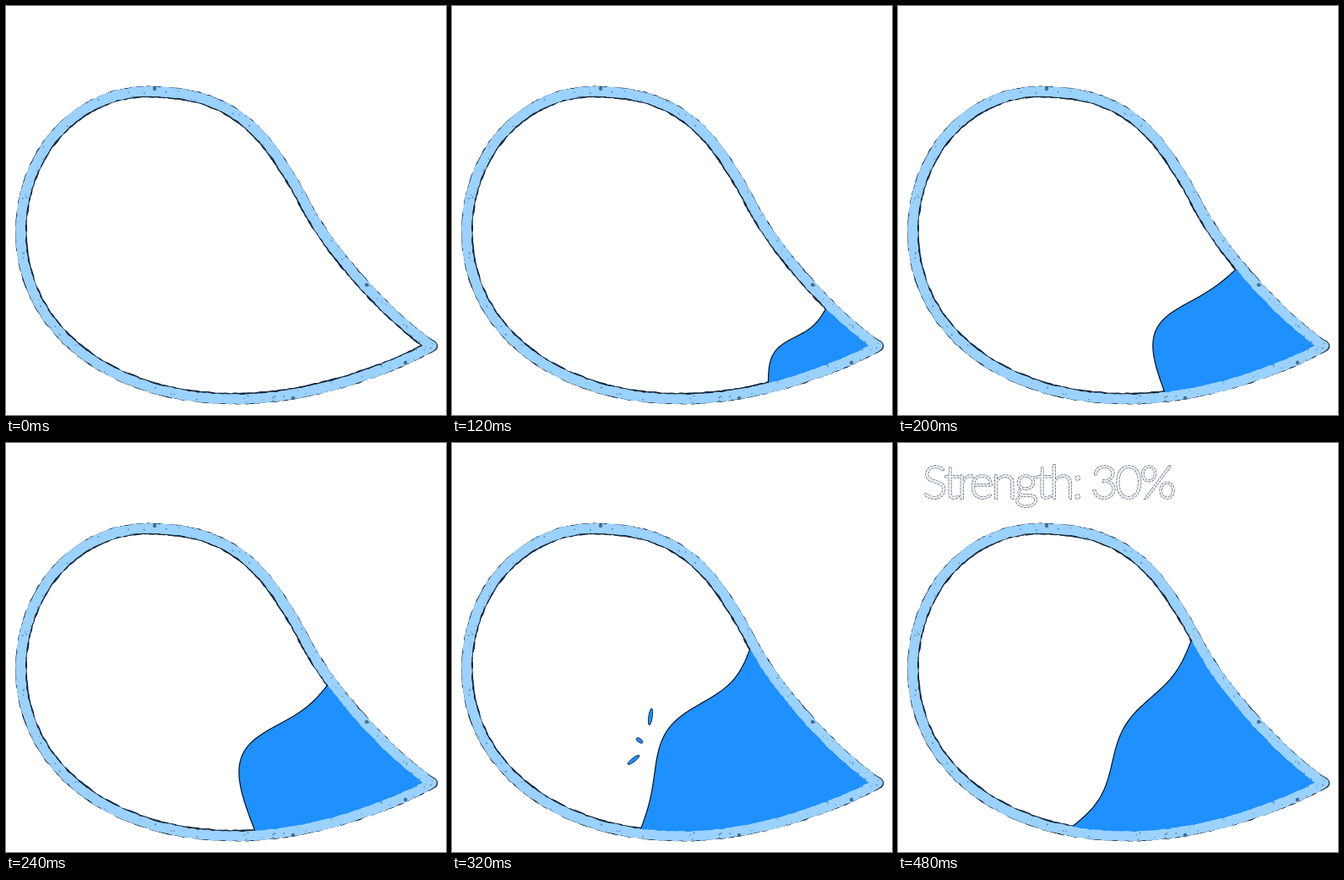
Write an HTML page with a canvas that moves like this. It is 521 px wide and 484 px high and loops after 0.52 s.

```html
<!DOCTYPE html>
<html lang="en">
<head>
<meta charset="utf-8">
<title>Strength meter</title>
<style>
  html, body { margin: 0; width: 100%; height: 100%; overflow: hidden; background: #fff; }
  canvas, svg { position: absolute; left: 0; top: 0; width: 521px; height: 484px; }
  text {
    font: 300 56px Lato, "Open Sans", sans-serif;
    letter-spacing: -3.4px;
    text-anchor: middle;
    fill: #edf1f6;
    stroke: #56606c;
    stroke-dasharray: 3 1;
    paint-order: stroke;
  }
</style>
</head>
<body>
<canvas id="stage" width="521" height="484"></canvas>
<svg viewBox="0 0 521 484"><text id="label">Strength: 30%</text></svg>
<script>
const W = 521, H = 484, STEP = 40, LOOP = 520;
const WATER = '#1e90ff';
const ctx = document.getElementById('stage').getContext('2d');
const label = document.getElementById('label');

let seed = 7;
const rand = () => (seed = (seed * 16807) % 2147483647) / 2147483647;
const jitter = size => (rand() - 0.5) * size;
const mix = (a, b, t) => a + (b - a) * t;
const clamp = t => Math.max(0, Math.min(1, t));

// Centre line of the rim, anticlockwise from the tip: two handles and an end per curve
const TIP = [504.5, 402.5];
const curves = [
  [[452, 366], [383, 292], [350, 226]],
  [[304, 141], [264, 103], [172, 101]],
  [[88, 99], [17.5, 170], [17.5, 268]],
  [[17.5, 380], [120, 465], [270, 465]],
  [[352, 466], [448, 434], TIP]
];

function sampleRim(n) {
  const pts = [TIP];
  let a = TIP;
  for (const [b, c, d] of curves) {
    for (let k = 1; k <= n; k++) {
      const t = k / n, s = 1 - t;
      pts.push([0, 1].map(j =>
        s * s * s * a[j] + 3 * s * s * t * b[j] + 3 * s * t * t * c[j] + t * t * t * d[j]));
    }
    a = d;
  }
  return pts;
}

const rim = sampleRim(120);

// Rim point i moved inwards by dist
function inset(i, dist) {
  const [x, y] = rim[i], [u, v] = rim[i + 1];
  const len = Math.hypot(u - x, v - y);
  return [x + (v - y) / len * dist, y - (u - x) / len * dist];
}

const inner = rim.slice(0, -1).map((p, i) => inset(i, 6));
const upperWall = inner.slice(0, 200), lowerWall = inner.slice(380);
const wallAt = (wall, x) =>
  wall.reduce((best, p) => Math.abs(p[0] - x) < Math.abs(best[0] - x) ? p : best);

function trace(c, pts) {
  pts.forEach(([x, y], i) => i ? c.lineTo(x, y) : c.moveTo(x, y));
}

function layer(draw) {
  const cv = document.createElement('canvas');
  cv.width = W;
  cv.height = H;
  draw(cv.getContext('2d'));
  return cv;
}

// Rough line: every short piece gets its own width and sideways shift
function roughLine(c, color, width, shift) {
  c.strokeStyle = color;
  c.lineCap = 'round';
  for (let i = 0; i < rim.length - 2; i++) {
    const side = shift + jitter(1.2);
    c.lineWidth = width + jitter(1.4);
    c.beginPath();
    trace(c, [inset(i, side), inset(i + 1, side)]);
    c.stroke();
  }
}

const edge = layer(c => roughLine(c, '#17293b', 12.9, 0.5));

const band = layer(c => {
  roughLine(c, '#9bd2ff', 10.9, -0.1);
  const speck = (x, y, r, color) => {
    c.fillStyle = color;
    c.beginPath();
    c.arc(x, y, r, 0, 7);
    c.fill();
  };
  for (let i = 0; i < 110; i++) {
    const [x, y] = inset(Math.floor(rand() * 600), jitter(12));
    speck(x, y, 0.4 + rand() * 0.8, '#6392b8');
  }
  for (const [x, y] of [[176, 98], [340, 464], [473, 422], [427, 330]]) {
    speck(x, y, 2.2, '#456f94');
  }
});

// Where the water front meets the walls, every second step
const upperX = [499, 466, 419, 381, 353, 347];
const lowerX = [499, 408, 339, 294, 223, 207];

function keyed(keys, step) {
  const k = Math.min(step / 2, keys.length - 1), i = Math.floor(k);
  return mix(keys[i], keys[Math.min(i + 1, keys.length - 1)], k - i);
}

// The front is a chord between the walls, bent by three sine waves
function waterFront(step) {
  const [x, y] = wallAt(upperWall, keyed(upperX, step));
  const [u, v] = wallAt(lowerWall, keyed(lowerX, step));
  const dx = u - x, dy = v - y;
  const swell = 0.25 * Math.exp(-(((Math.min(step, 10) - 5.5) / 2.6) ** 2));
  const lean = mix(-0.07, 0.01, clamp((step - 6) / 4));
  const ripple = -0.032 * clamp((step - 5) / 3);
  const pts = [];
  for (let s = -0.04; s <= 1.045; s += 0.02) {
    const a = Math.PI * s;
    const h = swell * Math.sin(a) + lean * Math.sin(2 * a) + ripple * Math.sin(3 * a);
    pts.push([x + dx * s - dy * h, y + dy * s + dx * h]);
  }
  return pts;
}

function drawWater(step) {
  const front = waterFront(step);
  const first = front[0], last = front[front.length - 1];
  ctx.save();
  ctx.beginPath();
  trace(ctx, rim);
  ctx.clip();
  ctx.beginPath();
  trace(ctx, [...front, [last[0], H], [W, H], [W, first[1]]]);
  ctx.fillStyle = WATER;
  ctx.fill();
  ctx.beginPath();
  trace(ctx, front);
  ctx.strokeStyle = '#07111c';
  ctx.lineWidth = 1.2;
  ctx.stroke();
  ctx.restore();
}

const drops = [
  { x: 235, y: 324, vx: 2, vy: -14, len: 20 },
  { x: 222, y: 352, vx: -15, vy: -10, len: 9 },
  { x: 215, y: 375, vx: -13, vy: 10, len: 17 }
];

// Drops fly along their own axis and shrink
function drawDrops(step) {
  const t = (step - 8) / 2;
  ctx.fillStyle = WATER;
  ctx.strokeStyle = '#0d2a45';
  ctx.lineWidth = 1;
  for (const { x, y, vx, vy, len } of drops) {
    ctx.beginPath();
    ctx.ellipse(x + vx * t, y + vy * t, len / 2 * (1 - 0.4 * t), 2.2, Math.atan2(vy, vx), 0, 7);
    ctx.fill();
    ctx.stroke();
  }
}

function drawLabel(step) {
  label.style.display = step >= 9 ? '' : 'none';
  if (step < 9) return;
  const t = (step - 10) / 2, s = mix(0.646, 1, t);
  label.setAttribute('transform', `translate(${mix(182, 177.5, t)} ${mix(64, 66, t)}) scale(${s})`);
  label.setAttribute('stroke-width', 1.4 / s);
}

function draw(step) {
  ctx.fillStyle = '#fff';
  ctx.fillRect(0, 0, W, H);
  ctx.drawImage(edge, 0, 0);
  if (step > 0) drawWater(step);
  ctx.drawImage(band, 0, 0);
  if (step >= 8 && step <= 11) drawDrops(step);
  drawLabel(step);
}

let shown = -1;
const start = performance.now();
function tick() {
  const step = Math.floor((performance.now() - start) % LOOP / STEP);
  if (step !== shown) draw(shown = step);
  requestAnimationFrame(tick);
}
tick();
</script>
</body>
</html>
```
